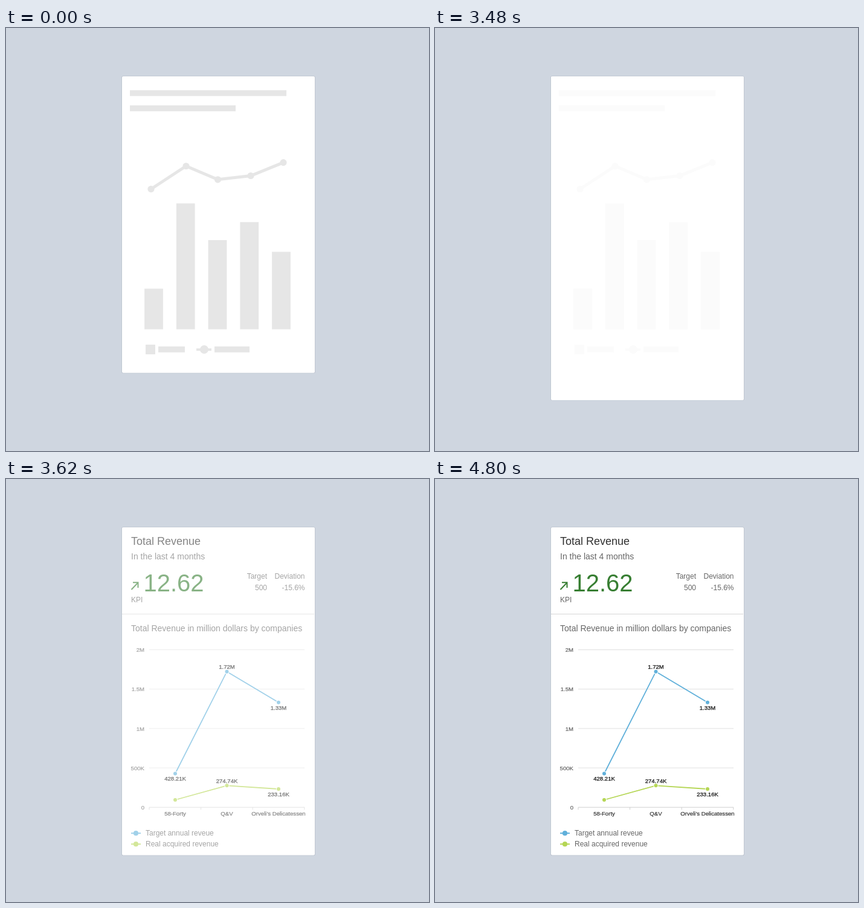
An HTML page with a canvas for the animation above (7.82 s loop, 700 px wide and 700 px high).

```html
<!DOCTYPE html>
<html lang="en">
<head>
<meta charset="utf-8">
<title>Revenue card</title>
<style>
html, body { margin: 0; width: 100%; height: 100%; overflow: hidden; background: #cfd6e0; }
canvas { display: block; width: 700px; height: 700px; }
</style>
</head>
<body>
<canvas id="stage" width="700" height="700"></canvas>
<script>
const ctx = document.getElementById('stage').getContext('2d');
const LOOP = 7820;
const CARD = { x: 192, y: 80, w: 319, loadingBottom: 570.7, bottom: 622.6 };
const BLUE = '#60b0da', LIME = '#b5d655', GREEN = '#377e32', GRAY = '#666';

const progress = (t, start, length) => Math.min(1, Math.max(0, (t - start) / length));
const swing = p => 0.5 - Math.cos(p * Math.PI) / 2;
const quartOut = p => 1 - (1 - p) ** 4;

function rect(x, y, w, h, color) {
  ctx.fillStyle = color;
  ctx.fillRect(x, y, w, h);
}

function path(points, color, width) {
  ctx.beginPath();
  points.forEach(([x, y]) => ctx.lineTo(x, y));
  ctx.strokeStyle = color;
  ctx.lineWidth = width;
  ctx.stroke();
}

function dot(x, y, r, color) {
  ctx.beginPath();
  ctx.arc(x, y, r, 0, Math.PI * 2);
  ctx.fillStyle = color;
  ctx.fill();
}

function text(str, x, y, size, color = GRAY, align = 'left', heft = 0) {
  ctx.font = `${size}px "Liberation Sans", Arial, sans-serif`;
  ctx.textAlign = align;
  ctx.fillStyle = color;
  ctx.fillText(str, x, y);
  if (heft) {
    ctx.strokeStyle = color;
    ctx.lineWidth = heft;
    ctx.strokeText(str, x, y);
  }
}

function cardShape(bottom, grow = 0) {
  ctx.beginPath();
  ctx.roundRect(CARD.x - grow, CARD.y - grow, CARD.w + 2 * grow, bottom - CARD.y + 2 * grow, 2);
}

function drawCard(bottom) {
  cardShape(bottom, 0.6);
  ctx.fillStyle = 'rgba(90, 100, 115, 0.2)';
  ctx.fill();
  cardShape(bottom);
  ctx.fillStyle = '#fff';
  ctx.fill();
}

function drawPlaceholder() {
  const color = '#e6e6e6';
  rect(205, 103, 259, 9.6, color);
  rect(205, 128, 175, 9.8, color);

  const trend = [[240, 266.5], [298, 228.5], [350.5, 250.8], [405, 244.5], [459, 222.6]];
  path(trend, color, 5);
  trend.forEach(([x, y]) => dot(x, y, 5.6, color));

  [431.4, 290.3, 351, 321.2, 370.4].forEach((top, i) =>
    rect(229.1 + i * 52.75, top, 30.8, 498.6 - top, color));

  rect(231, 524, 16, 16, color);
  rect(252, 527, 44, 9.8, color);
  path([[315, 532.2], [340, 532.2]], color, 4);
  dot(328, 532, 7, color);
  rect(345, 527, 58, 9.8, color);
}

function drawSeries(points, color) {
  path(points, color, 1.8);
  points.forEach(([x, y]) => {
    dot(x, y, 4, '#fff');
    dot(x, y, 3, color);
  });
}

function drawHeader() {
  text('Total Revenue', 207, 109, 18, '#2f2f2f');
  text('In the last 4 months', 207, 133, 14);
  text('12.62', 227.4, 185.6, 40, GREEN);
  path([[207.5, 183], [218, 172]], GREEN, 2);
  path([[210, 171.2], [218.5, 171.2], [218.5, 180]], GREEN, 2);
  text('KPI', 207, 204, 12);
  text('Target', 432, 165, 12, GRAY, 'right');
  text('500', 432, 184, 12, GRAY, 'right');
  text('Deviation', 494.5, 165, 12, GRAY, 'right');
  text('-15.6%', 494.5, 184, 12, GRAY, 'right');
  rect(192, 223, 318, 1, '#d6d6d6');
}

function drawChart() {
  const columns = [280, 365.5, 451];
  text('Total Revenue in million dollars by companies', 207, 252, 14);

  ['2M', '1.5M', '1M', '500K', '0'].forEach((label, i) => {
    const y = 282.5 + i * 65.2;
    path([[237, y], [494, y]], i === 4 ? '#cfcfcf' : '#e6e6e6', i === 4 ? 1.1 : 1.3);
    text(label, 229, y + 3.6, 9.6, '#606060', 'right', 0.2);
  });
  for (let i = 0; i < 4; i++) {
    const x = 237 + i * 85.6;
    path([[x, 543.3], [x, 547.3]], '#cfcfcf', 1);
  }
  ['58-Forty', 'Q&V', "Orveli's Delicatessen"].forEach((name, i) =>
    text(name, columns[i], 557.2, 9.6, '#333', 'center', 0.2));

  drawSeries([[280, 487.5], [365.5, 318.7], [451, 369.7]], BLUE);
  drawSeries([[280, 531], [365.5, 507.3], [451, 513]], LIME);

  [['428.21K', 0, 499.4], ['1.72M', 1, 314], ['1.33M', 2, 381.8],
   ['274.74K', 1, 502.6], ['233.16K', 2, 524.6]].forEach(([label, i, y]) =>
    text(label, columns[i], y, 9.6, '#111', 'center', 0.25));

  [['Target annual reveue', 590, BLUE], ['Real acquired revenue', 608, LIME]].forEach(([label, y, color]) => {
    path([[207, y - 3.8], [223, y - 3.8]], color, 2);
    dot(215, y - 3.8, 4.1, color);
    text(label, 231, y, 12);
  });
}

// Whitening the finished card keeps overlapping shapes uniform while fading.
function veil(bottom, opacity) {
  if (opacity <= 0) return;
  cardShape(bottom);
  ctx.fillStyle = `rgba(255, 255, 255, ${opacity})`;
  ctx.fill();
}

function render(time) {
  const t = Math.floor((time % LOOP) / 20) * 20;
  const growth = t < 3360 ? 0 : swing(progress(t, 3335, 190));
  const fadeOut = t < 3360 ? 0 : progress(t, 3340, 167);
  const fadeIn = quartOut(progress(t, 3540, 400));
  const bottom = CARD.loadingBottom + (CARD.bottom - CARD.loadingBottom) * growth;

  rect(0, 0, 700, 700, '#cfd6e0');
  drawCard(bottom);
  if (fadeOut < 1) {
    drawPlaceholder();
    veil(bottom, fadeOut);
  } else if (fadeIn > 0) {
    drawHeader();
    drawChart();
    veil(bottom, 1 - fadeIn);
  }
}

let start;
function tick(now) {
  start ??= now;
  render(Math.max(0, now - start));
  requestAnimationFrame(tick);
}
render(0);
requestAnimationFrame(tick);
</script>
</body>
</html>
```
